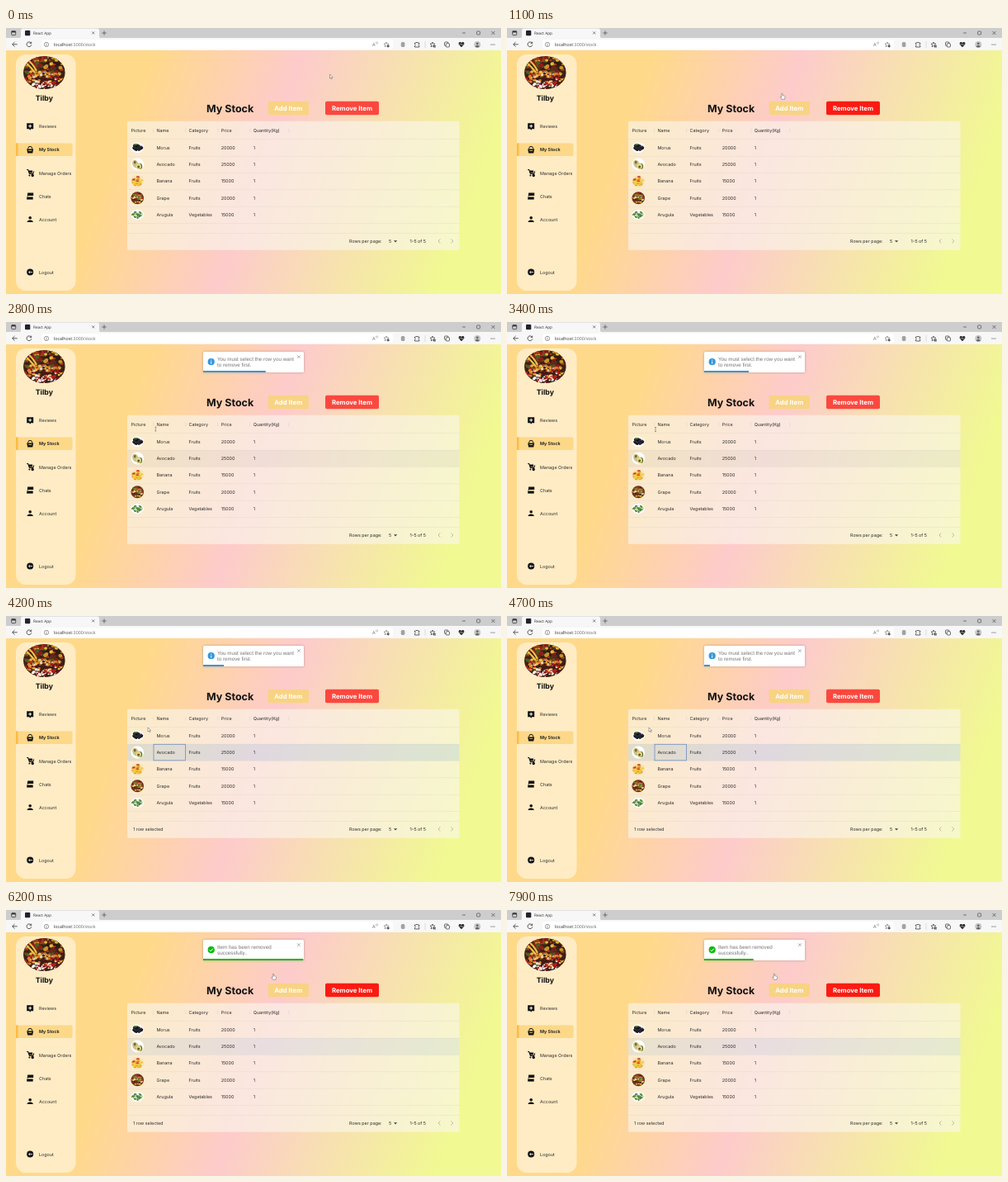
Write an HTML page that moves like this. It is 600 px wide and 322 px high and loops after 8 s.

```html
<!DOCTYPE html>
<html lang="en">
<head>
<meta charset="utf-8">
<title>React App</title>
<style>
html, body { margin: 0; width: 100%; height: 100%; overflow: hidden; }
svg {
  display: block; width: 600px; height: 322px;
  background: linear-gradient(110deg, #ffd98a 25%, #fdcbcb 51%, #f1f992 89%) 0 27px / 600px 295px no-repeat;
}
text { font-family: Inter, sans-serif; font-size: 5.4px; fill: #2a2a2a; text-rendering: geometricPrecision; }
.chrome text { font-family: "Open Sans", sans-serif; }
.line { fill: none; stroke: #333; stroke-width: .8; }
.toast { filter: drop-shadow(0 .5px 1.5px rgba(0, 0, 0, .25)); }
.toast text { font-family: "Liberation Sans", Arial, sans-serif; font-size: 6.25px; fill: #757575; }
</style>
</head>
<body>
<svg id="stage" viewBox="0 0 600 322"></svg>
<script>
const LOOP = 8000, BAR_MS = 3367, BOUNCE_MS = 470, PX = 0.39;
const stage = document.getElementById('stage');

const rect = (x, y, w, h, fill, more = '') =>
  `<rect x="${x}" y="${y}" width="${w}" height="${h}" fill="${fill}" ${more}/>`;
const oval = (x, y, rx, ry, fill, more = '') =>
  `<ellipse cx="${x}" cy="${y}" rx="${rx}" ry="${ry}" fill="${fill}" ${more}/>`;
const text = (x, y, s, more = '') => `<text x="${x}" y="${y}" ${more}>${s}</text>`;
const line = (d, more = '') => `<path class="line" d="${d}" ${more}/>`;
const shape = (d, fill = '#111', more = '') => `<path d="${d}" fill="${fill}" ${more}/>`;
const at = (x, y, s) => `<g transform="translate(${x} ${y})">${s}</g>`;

function random(seed) {
  return () => (seed = (seed * 16807) % 2147483647) / 2147483647;
}

// A soft heap of coloured blobs inside an ellipse.
function heap(seed, count, rx, ry, size, colors) {
  const rnd = random(seed * 7919);
  rnd();
  let out = '';
  for (let i = 0; i < count; i++) {
    const a = rnd() * 2 * Math.PI, r = Math.sqrt(rnd()), s = size * (.6 + .7 * rnd());
    out += oval((Math.cos(a) * r * rx).toFixed(1), (Math.sin(a) * r * ry).toFixed(1),
      s.toFixed(1), (s * .8).toFixed(1), colors[i % colors.length]);
  }
  return out;
}

function browser() {
  const star = 'M0-3 .9-1 3-.8 1.4.7 1.9 2.8 0 1.7-1.9 2.8-1.4.7-3-.8-.9-1Z';
  return `<g class="chrome">` +
    rect(0, 0, 600, 13, '#cdcdcd') +
    rect(0, 12, 600, 15, '#f7f7f7') +
    shape('M16 12.5Q18 12.5 18 10V3Q18 .5 20.5 .5H110.5Q113 .5 113 3V10Q113 12.5 115 12.5Z', '#f7f7f7') +
    rect(6.7, 3.7, 5, 5, 'none', 'rx="1" stroke="#333" stroke-width=".8"') + rect(6.7, 3.7, 5, 1.7, '#333') +
    rect(23, 3, 6.3, 6.3, '#20232a', 'rx="1"') +
    text(33, 8.1, 'React App', 'style="font-size:4.7px"') +
    line('M104.2 4.4l3 3m0-3l-3 3M116.3 6h5.4M119 3.3v5.4M553 6h4M588.5 4l4 4m0-4l-4 4', 'style="stroke-width:.6"') +
    rect(570.6, 4, 4, 4, 'none', 'rx="1" stroke="#333" stroke-width=".6"') +
    rect(43, 14, 426, 11.5, '#fff', 'rx="3"') +
    line('M13.7 19.8H7.8M10.5 17L7.7 19.8 10.5 22.6') +
    line('M30.4 18.2A2.9 2.9 0 1 0 30.8 20.3M30.7 16.7V18.6H28.7') +
    oval(49, 20, 2.7, 2.7, 'none', 'stroke="#666" stroke-width=".6"') + line('M49 19.6v2M49 18.3v.6', 'style="stroke:#666"') +
    text(58, 21.8, 'localhost<tspan fill="#666">:3000/stock</tspan>', 'style="font-size:5.3px"') +
    text(444, 22, 'A', 'style="font-size:5.6px;fill:#666"') + line('M448.5 17q1 1 0 2M449.8 16.3q1.5 1.6 0 3.3', 'style="stroke:#777;stroke-width:.5"') +
    at(461, 20, line(star, 'style="stroke:#666;stroke-width:.6"') + oval(2.3, 2, 1.4, 1.4, '#555')) +
    rect(478.8, 17, 4.6, 6, '#a2a2a2', 'rx="1.5"') +
    line('M495.5 18h1.7q.8-2 1.8 0h1.8v1.6q-2 .8 0 1.9V23h-5.3v-1.6q1.8-.9 0-1.8Z') +
    rect(507.7, 16, .6, 8, '#ccc') +
    at(517, 20, line(star, 'style="stroke-width:.7"')) + line('M518 21.5h3M518 23h3') +
    rect(531.5, 17, 4.5, 4.5, 'none', 'rx="1" stroke="#333" stroke-width=".7"') +
    rect(533.2, 18.7, 4.3, 4.3, '#f7f7f7', 'rx="1" stroke="#333" stroke-width=".7"') +
    shape('M552 23.3L548.8 20Q548.2 17.3 550.2 17 551.5 17 552 18 552.6 17 553.9 17 555.9 17.4 555.2 20Z', '#222') +
    line('M549 20h2l.8-1.2.9 2 .7-.8H555', 'style="stroke:#f7f7f7;stroke-width:.5"') +
    oval(571.3, 20, 4, 4, '#c7c7c7') + oval(571.3, 18.8, 1.4, 1.4, '#666') + shape('M568.6 22.5Q571.3 19.2 574 22.5 571.3 24.5 568.6 22.5Z', '#666') +
    [588, 590, 592].map(x => oval(x, 20, .6, .6, '#333')).join('') + '</g>';
}

function avatar() {
  return `<clipPath id="face"><ellipse cx="46.3" cy="54" rx="25.3" ry="20"/></clipPath><g clip-path="url(#face)">` +
    rect(20, 33, 53, 42, '#3a2016') +
    at(46.3, 47, heap(5, 120, 26, 13, 2.3, ['#c9952c', '#4f5c20', '#a83a1c', '#e5b83f', '#2c1a12', '#8c1c19', '#55301c'])) +
    at(30, 45, line('M-7-4Q0 2 5 9M-4-7Q3-1 7 7', 'style="stroke:#eec24a;stroke-width:2.2"')) +
    at(46.3, 61, heap(9, 120, 25, 8, 1.7, ['#b5201b', '#e9dfd0', '#d9802a', '#5c1412', '#eabc45', '#3d1a14'])) +
    at(46.3, 70, heap(3, 50, 20, 4, 1.4, ['#f4eee6', '#b82020', '#fff', '#6d1815'])) + '</g>';
}

function sidebar() {
  const icons = [
    shape('M-4-4H4V3H1L0 4.5-1 3H-4Z') + line('M0-2.5v4M-2-.5h4', 'style="stroke:#fff;stroke-width:1"'),
    shape('M-4-1H4L3 4H-3Z') + line('M-2.8-1L-1.5-3.8H1.5L2.8-1', 'style="stroke:#111;stroke-width:1"') + rect(-2, .7, 4, .8, '#fdd888'),
    line('M-4-4h1.5L-.8 1H3.5L4.5-2', 'style="stroke:#111;stroke-width:1.1"') + shape('M-2-3H3L2.6 0H-1Z') + oval(-.8, 3, 1, 1, '#111') + oval(3, 3, 1.7, 1.7, '#111'),
    shape('M-3-4H4V-.5H-2L-3.5.4Z') + shape('M-4 .9H3.5V4H-4Z'),
    oval(0, -1.9, 1.8, 1.8, '#111') + shape('M-3.6 3.4Q-3.6 .8 0 .8T3.6 3.4Z'),
    oval(0, 0, 4, 4, '#111') + line('M3 0H-1.5M0-1.5L-1.6 0 0 1.5', 'style="stroke:#fff;stroke-width:.8"'),
  ];
  const items = [['Reviews', 119.3], ['My Stock', 147.4], ['Manage Orders', 175.5],
    ['Chats', 203.6], ['Account', 231.7], ['Logout', 295.6]];
  return rect(12, 32, 72.5, 286, '#fff', 'rx="12" opacity=".5"') + avatar() +
    text(46.3, 88.4, 'Tilby', 'text-anchor="middle" style="font-size:8.75px;font-weight:700;fill:#111"') +
    rect(12, 139.4, 68.6, 15.6, '#fdd888', 'rx="2"') + rect(12, 139.4, 2.4, 15.6, '#fcbb42') +
    items.map(([name, y], i) => at(29.2, y, icons[i]) +
      text(40, y + 2, name, i === 1 ? 'font-weight="700"' : '')).join('');
}

const rowY = i => 144.7 + i * 20.35;
const cols = [151.5, 182.5, 221.5, 260.7, 299.7];

function thumb(i) {
  const white = oval(0, 0, 7.8, 7.5, '#fff');
  return [
    () => oval(0, 0, 7.8, 6.3, '#fff') +
      heap(4, 36, 6.2, 3.6, 1.7, ['#1d1a26', '#33263c', '#15131c', '#26301d']) + oval(-2, -3.6, 2, 1, '#567a35'),
    () => white + oval(-1.8, -1.5, 3.6, 5, '#c9c486', 'transform="rotate(-25)"') + oval(2.6, 2.4, 3.4, 3.6, '#5b7426') +
      oval(1.6, 2.4, 3, 3.4, '#e3dc8f') + oval(1.4, 3, 1.5, 1.5, '#7a4a28') + oval(-3, -2.5, 1.3, 1.9, '#8a5c30'),
    () => oval(0, 0, 7.8, 7.5, '#f6e4ba') + heap(8, 26, 6, 5, 1.6, ['#e7b12c', '#f2cf4d', '#c94424', '#e98728']) +
      line('M-6 0Q0 4 6-1M-5 3Q0 6 5 2', 'style="stroke:#f3cd40;stroke-width:1.5"'),
    () => oval(0, 0, 7.8, 7.5, '#6b331b') + heap(6, 50, 6.3, 6, 1.3, ['#b93022', '#e0a32e', '#64812a', '#351a18', '#ecd47c']),
    () => oval(0, 0, 7.8, 6, '#fff') + heap(2, 60, 6.6, 4, .9, ['#3f7c2c', '#5d9a3c', '#2d6422', '#a5c888']),
  ][i]();
}

function table() {
  const rows = [['Morus', 'Fruits', 20000], ['Avocado', 'Fruits', 25000], ['Banana', 'Fruits', 15000],
    ['Grape', 'Fruits', 20000], ['Arugula', 'Vegetables', 15000]];
  const rule = y => rect(147, y, 402.5, .5, '#d5cfc4', 'opacity=".55"');
  return rect(147, 112.7, 402.5, 156, '#faf7ee', 'rx="1.5" opacity=".62"') +
    rect(147, rowY(1) - 10.1, 402.5, 20.2, '#000', 'id="row"') +
    ['Picture', 'Name', 'Category', 'Price', 'Quantity(Kg)'].map((s, i) => text(cols[i], 125.8, s)).join('') +
    [178.5, 217.5, 256.5, 295.5, 342.5].map(x => rect(x, 121.5, .6, 5, '#ddd6cc')).join('') +
    [134.5, 154.9, 175.2, 195.6, 215.9, 236.3, 248].map(rule).join('') +
    rows.map((r, i) => at(159.2, rowY(i), thumb(i)) +
      [...r, 1].map((s, j) => text(cols[j + 1], rowY(i) + 1.9, s)).join('')).join('') +
    rect(179, rowY(1) - 9.8, 38.6, 19.6, 'none', 'id="cell" stroke="#5c84bd" stroke-width=".7"') +
    text(154, 260, '1 row selected', 'id="count"') +
    text(416, 260, 'Rows per page:') + text(464, 260, '5') + shape('M470 257.2h4.2l-2.1 2.2Z', '#444') +
    text(489.5, 260, '1–5 of 5') +
    line('M524 255.5l2.3 2.5-2.3 2.5', 'style="stroke:none"') +
    line('M526.3 255.5l-2.3 2.5 2.3 2.5M539.5 255.5l2.3 2.5-2.3 2.5', 'style="stroke:#aaa"');
}

function toast(id, color, icon, first, second) {
  return `<g clip-path="url(#page)"><g id="${id}" class="toast">` +
    rect(239, 36, 122, 25, '#fff', 'rx="1.5"') +
    oval(248.7, 48.2, 4.1, 4.1, color) + line(icon, 'style="stroke:#fff;stroke-width:1"') +
    text(256, 46.8, first) + text(256, 54.1, second) +
    line('M353 40.3l3.6 3.6m0-3.6l-3.6 3.6', 'style="stroke:#888;stroke-width:.7"') +
    rect(239, 59, 122, 2, color, `id="${id}Bar"`) + '</g></g>';
}

const button = (x, w, fill, label, id) => rect(x, 88.7, w, 16.6, fill, `rx="2" id="${id}"`) +
  text(x + w / 2, 99.8, label, 'text-anchor="middle" style="font-size:7.75px;font-weight:700;fill:#fff"');

const ink = 'stroke="#555" stroke-width=".5" stroke-linejoin="round"';
const pointers = {
  arrow: shape('M0 0V5L1.2 4 2 5.7 2.8 5.4 2.1 3.7H3.6Z', '#fff', ink),
  hand: shape('M-.7.5Q0-.4.6.5V2.6L3 3.3Q3.8 3.7 3.6 4.8L3 7.2H-.5L-2.2 4.8Q-2.1 3.8-.7 4.6Z', '#fff', ink),
  beam: line('M-1-2.5H1M-1 2.5H1M0-2.5V2.5', 'style="stroke:#555;stroke-width:.5"'),
};

stage.innerHTML = '<clipPath id="page"><path d="M0 27H600V322H0Z"/></clipPath>' +
  browser() + sidebar() +
  text(243, 101.7, 'My Stock', 'style="font-size:12.5px;font-weight:700;fill:#111"') +
  button(317.5, 49.5, '#f8d384', 'Add Item', 'add') + button(387, 65, '#fb483f', 'Remove Item', 'remove') +
  table() +
  toast('info', '#3498db', 'M248.7 47.6v3M248.7 45.6v1', 'You must select the row you want', 'to remove first.') +
  toast('done', '#07bc0c', 'M246.6 48.4l1.5 1.5 2.8-3.2', 'Item has been removed', 'successfully..') +
  '<g id="mouse">' + Object.entries(pointers).map(([k, s]) => `<g id="${k}">${s}</g>`).join('') + '</g>';

const $ = id => document.getElementById(id);
const show = (id, on) => $(id).setAttribute('visibility', on ? 'visible' : 'hidden');
const clamp = v => Math.max(0, Math.min(1, v));
const easeOut = u => 1 - (1 - u) ** 3;
const smooth = u => u * u * (3 - 2 * u);

// Interpolates numbers along [position, ...values] stops.
function track(stops, p, ease) {
  let i = 0;
  while (i < stops.length - 2 && p >= stops[i + 1][0]) i++;
  const [a, ...from] = stops[i], [b, ...to] = stops[i + 1];
  const u = ease(clamp((p - a) / (b - a)));
  return from.map((v, k) => v + (to[k] - v) * u);
}

const enter = [[0, -3000, 0], [.6, 25, 1], [.75, -10, 1], [.9, 5, 1], [1, 0, 1]];
const leave = [[0, 0, 1], [.2, -10, 1], [.4, 20, 1], [.45, 20, 1], [1, -2000, 0]];
const path = [[0, 392.5, 56], [250, 392.5, 56], [850, 333.5, 79], [1950, 333.5, 79], [2850, 180, 130],
  [3600, 180, 130], [4000, 172, 135], [4750, 172, 135], [5150, 323.5, 77], [5800, 324, 77], [LOOP, 324, 77]];

function drawToast(id, start, t) {
  const barStart = start + BOUNCE_MS, end = barStart + BAR_MS;
  const [dy, alpha] = t < end ? track(enter, (t - start) / BOUNCE_MS, easeOut)
    : track(leave, (t - end) / BOUNCE_MS, smooth);
  show(id, t >= start && t < end + BOUNCE_MS);
  $(id).setAttribute('transform', `translate(0 ${dy * PX})`);
  $(id).setAttribute('opacity', alpha);
  $(id + 'Bar').setAttribute('width', 122 * clamp(1 - (t - barStart) / BAR_MS));
}

function draw(t) {
  const onButton = (t > 750 && t < 2150) || t > 5050;
  const onRow = t > 2750 && t < 4850, picked = t >= 4100;
  $('remove').setAttribute('fill', onButton ? '#fb1b12' : '#fb483f');
  show('row', onRow || picked);
  $('row').setAttribute('fill', picked ? '#1976d2' : '#000');
  $('row').setAttribute('opacity', picked ? (onRow ? .12 : .08) : .04);
  show('cell', picked && t < 5650);
  show('count', picked);
  drawToast('info', 1055, t);
  drawToast('done', 5713, t);
  const beam = t > 2750 && t < 3800;
  show('arrow', !onButton && !beam);
  show('hand', onButton);
  show('beam', beam);
  $('mouse').setAttribute('transform', `translate(${track(path, t, smooth)})`);
}

const begin = performance.now();
function tick() {
  draw((performance.now() - begin) % LOOP);
  requestAnimationFrame(tick);
}
tick();
</script>
</body>
</html>
```
